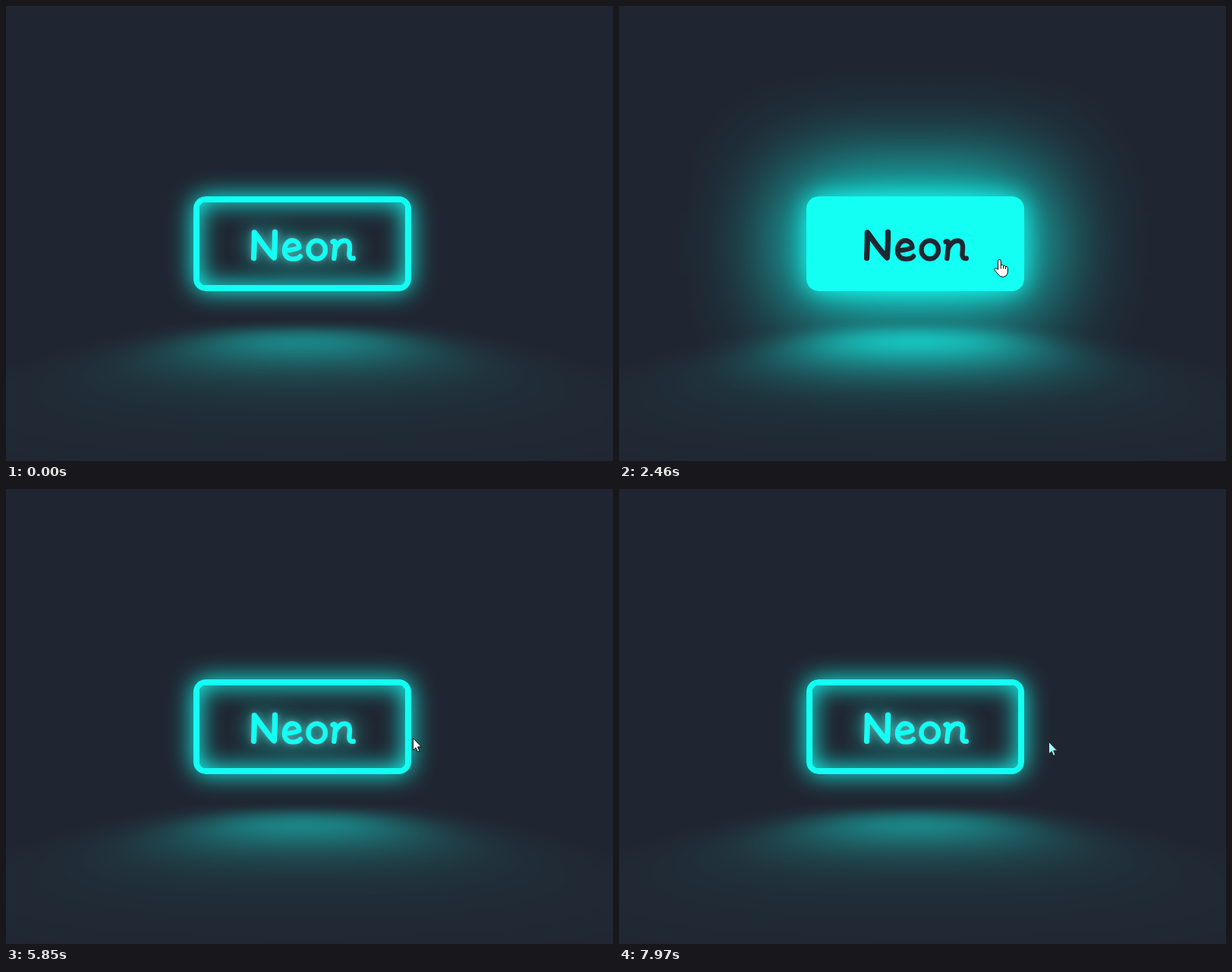
Animation, 800 px wide and 600 px high, one loop 8000 ms. Source, as an HTML page:

```html
<!DOCTYPE html>
<html lang="en">
<head>
<meta charset="utf-8">
<title>Neon button</title>
<style>
  :root {
    --neon: hsl(177 100% 54%);
    --bg: hsl(219 21% 16%);
    background: var(--bg);
  }
  html, body {
    margin: 0;
    width: 100%;
    height: 100%;
    overflow: hidden;
  }
  .button {
    position: absolute;
    left: 247px;
    top: 251px;
    width: 287px;
    height: 125px;
    box-sizing: border-box;
    font: 64px Lato, sans-serif;
    color: var(--neon);
    border: .125em solid var(--neon);
    border-radius: .25em;
    box-shadow: inset 0 0 .5em var(--neon), 0 0 .5em var(--neon);
  }
  .button::before, .button::after {
    content: "";
    position: absolute;
    background: var(--neon);
  }
  /* light on the floor */
  .button::before {
    top: 120%;
    left: 0;
    width: 100%;
    height: 100%;
    transform: perspective(1em) rotateX(40deg) scale(1, .35);
    filter: blur(1em);
    opacity: .7;
  }
  /* hover fill and wide glow */
  .button::after {
    inset: 0;
    z-index: -1;
    box-shadow: 0 0 2em .5em var(--neon);
    opacity: var(--fill, 0);
  }
  .button.hover { color: var(--bg); }
  .button.hover::before { opacity: 1; }
  .button.hover .glow { display: none; }
  .label {
    position: absolute;
    inset: 0;
    text-align: center;
    line-height: 109px;
    color: transparent;
  }
  .letters {
    position: absolute;
    left: -255px;
    top: -259px;
    fill: none;
    stroke: currentColor;
    stroke-width: 6.4;
    stroke-linecap: round;
    stroke-linejoin: round;
  }
  .stem { stroke-width: 7.2; }
  .wide { filter: blur(14.4px); }
  .near { filter: blur(4px); stroke: rgb(255 255 255 / .3); }
  .cursor {
    position: absolute;
    left: 0;
    top: 0;
    overflow: visible;
    fill: #fff;
    stroke: #000;
    stroke-linejoin: round;
  }
  .cursor.tint { fill: #9dfff8; stroke: var(--bg); }
  .cursor .hand, .cursor.point .arrow { display: none; }
  .cursor.point .hand { display: inline; }
</style>
</head>
<body>
<div class="button">
  <span class="label">Neon</span>
  <svg class="letters" width="800" height="600" aria-hidden="true">
    <defs>
      <g id="word">
        <path class="stem" d="M326.5 332.5C327 321 327.5 310 327.3 298.5C333 306 344 323 353.3 332C354.3 320 354.5 309 354.5 298.2"/>
        <path d="M368 322.5C375 322 382 321 386.5 318.5C386 312 381.5 309.3 377.5 309.3C371 309.3 367 316 367 322.5C367 329.5 371.5 333.6 378 333.6C383 333.6 386.5 332 388 330"/>
        <ellipse cx="409.7" cy="321.4" rx="11.2" ry="12"/>
        <path d="M430.5 311C433.5 309 434.5 311 434.3 314L432.3 332.8M434 320C437 313 441 309.5 446 309.5C452 309.5 453.5 314 453 320C452.5 326 450.5 333.5 457.8 332.8"/>
      </g>
    </defs>
    <use href="#word" class="glow wide"/>
    <use href="#word" class="glow near"/>
    <use href="#word"/>
  </svg>
</div>
<svg class="cursor" width="20" height="25" aria-hidden="true">
  <path class="arrow" d="M.5 .5V16.5L4.1 13.1L6.5 18.5L9 17.5L6.7 12H11.5Z"/>
  <g class="hand" transform="translate(-7)">
    <path d="M5.5 13.5V2.3a1.9 1.9 0 0 1 3.8 0V7.5q2.6-1 3.2 1q2.4-.8 3 1q2.6-.5 2.9 1.8V16c0 3-1.5 4.5-2.5 6q-3 2.5-7.4.5C6.5 20 3.5 18 1.5 14.8C-.5 12 3 10.5 5.5 13.5Z"/>
    <path d="M9.3 7.5V12.5M12.5 8.5V12.5M15.5 9.5V13" fill="none"/>
  </g>
</svg>
<script>
const LOOP = 8000;
const easeIn = p => u => u ** p;
const easeOut = p => u => 1 - (1 - u) ** p;
const linear = u => u;
const smooth = u => u * u * (3 - 2 * u);

// The pointer moves in short held steps along each path.
const moves = [
  { from: 280, to: 440, steps: 3, ease: linear, path: [[690, 605], [690, 585], [714, 565], [708, 548]] },
  { from: 670, to: 1150, steps: 7, ease: smooth, path: [[708, 548], [688, 476], [653, 414]] },
  { from: 1380, to: 1680, steps: 5, ease: linear, path: [[653, 414], [647, 402], [635, 382], [623, 361], [612, 344], [625, 342]] },
  { from: 1860, to: 2460, steps: 9, ease: easeOut(1.4), path: [[625, 342], [501, 334]] },
  { from: 3790, to: 4510, steps: 10, ease: easeIn(1.8), path: [[501, 334], [573, 335], [645, 335], [759, 334]] },
  { from: 5070, to: 5850, steps: 11, ease: easeOut(1.4), path: [[759, 334], [536, 328]] },
  { from: 5930, to: 6200, steps: 4, ease: easeOut(1.3), path: [[536, 328], [496, 332]] },
  { from: 7660, to: 7970, steps: 5, ease: easeIn(1.5), path: [[496, 332], [566, 333]] }
];

const button = document.querySelector(".button");
const cursor = document.querySelector(".cursor");

function along(path, u) {
  const s = u * (path.length - 1);
  const i = Math.min(Math.floor(s), path.length - 2);
  return path[i].map((v, axis) => v + (path[i + 1][axis] - v) * (s - i));
}

const pointAt = (move, step) => along(move.path, move.ease((step + 1) / move.steps));
const inside = ([x, y]) => x >= 247 && x < 534 && y >= 251 && y < 376;

function draw(now) {
  const t = now % LOOP;
  const move = moves.findLast(m => t >= m.from);
  cursor.style.display = move ? "" : "none";
  let over = false, fill = 0, tint = false;
  if (move) {
    const gap = (move.to - move.from) / (move.steps - 1);
    const step = Math.min(move.steps - 1, Math.floor((t - move.from) / gap + .01));
    const pos = pointAt(move, step);
    const before = inside(pointAt(move, step - 1));
    over = inside(pos);
    // the fill fades over two steps
    fill = over === before ? +over : .5;
    tint = !over && (before || inside(pointAt(move, Math.max(step - 2, -1))));
    cursor.style.transform = `translate(${Math.round(pos[0])}px, ${Math.round(pos[1])}px)`;
  }
  button.style.setProperty("--fill", fill);
  button.classList.toggle("hover", over);
  cursor.classList.toggle("point", over);
  cursor.classList.toggle("tint", tint);
}

function tick(now) {
  draw(now);
  requestAnimationFrame(tick);
}
draw(0);
requestAnimationFrame(tick);
</script>
</body>
</html>
```
